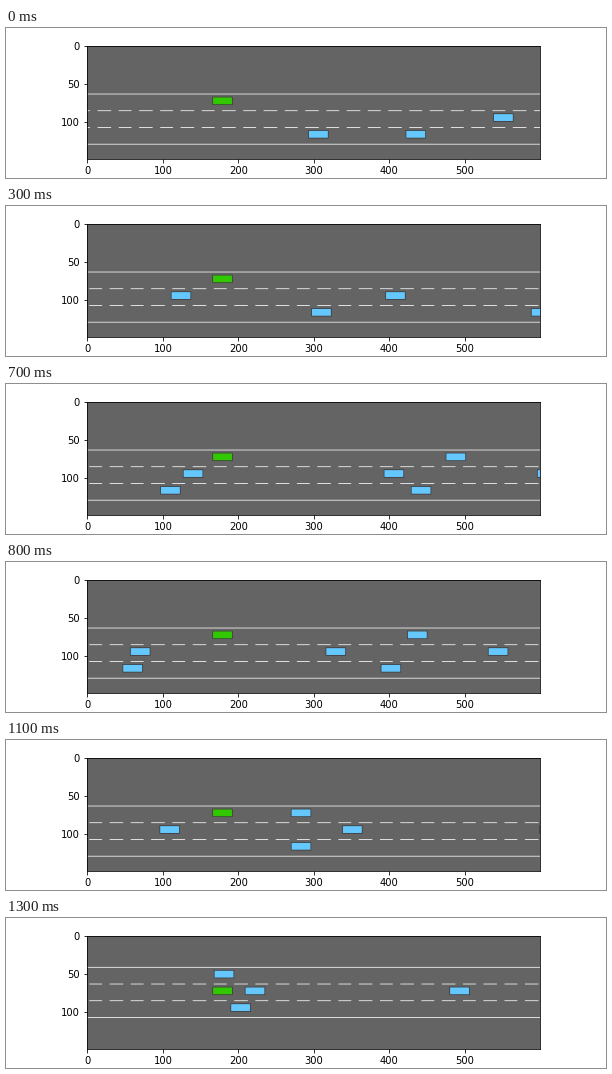
Recreate the animation shown at these times as a matplotlib script. Size 600x150 px, loop 1.4 s.

```python
import numpy as np
import matplotlib.pyplot as plt
from matplotlib.animation import FuncAnimation

DPI = 72
WIDTH, HEIGHT = 600, 150
FRAMES, INTERVAL = 14, 100

SCALE = 5.5                      # road pixels per metre
LANE = 22                        # lane height in road pixels
CAR_LENGTH, CAR_HEIGHT = 27, 11
LINE_TOP, CAR_TOP = 64, 68
EGO_X = 166
STRIPE_GAP, STRIPE_LENGTH = 27.5, 16.5
STRIPE_PHASE = 14.5

ROAD = (100, 100, 100)
WHITE = (255, 255, 255)
OUTLINE = (60, 60, 60)
GREEN = (50, 200, 0)
BLUE = (100, 200, 255)


class Car:
    """A car that the ego car passes at a given step and closing speed."""

    def __init__(self, lane, passed, speed, settle=0, weaves=False):
        self.lane, self.passed, self.speed = lane, passed, speed
        self.settle, self.weaves = settle, weaves

    def x(self, t):
        steady = EGO_X - self.speed * (t - self.passed)
        return steady - self.settle * np.exp(-0.4 * t) - ego_lead(t)

    def row(self, t):
        return max(0, self.lane - t // 2) if self.weaves else self.lane


CARS = [
    Car(2, 2.17, 66.3, weaves=True),
    Car(2, 5.66, 50.8, settle=15),
    Car(1, 6.53, 72, settle=82),
    Car(1, 9.94, 70.3, settle=-336),
    Car(0, 13.04, 51.1),
    Car(2, 13.61, 39.8),
    Car(1, 13.67, 64.4),
    Car(1, 18.28, 59.5),
]


def ego_lead(t):
    """Road pixels still to be lost while speeding up from 25 to 30 m/s."""
    return 3 * SCALE * np.exp(-1.766 * t)


def camera_shift(t):
    """Vertical camera offset as the ego car eases one lane down."""
    return int(round(LANE * (1 - np.exp(-3 * max(t - 11, 0)))))


def fill(image, x, y, w, h, color):
    image[max(y, 0):max(y + h, 0), max(x, 0):max(x + w, 0)] = color


def draw_car(image, x, y, color):
    fill(image, x, y, CAR_LENGTH, CAR_HEIGHT, OUTLINE)
    fill(image, x + 1, y + 1, CAR_LENGTH - 2, CAR_HEIGHT - 2, color)


def draw_lines(image, t, shift):
    travelled = SCALE * (30 * t - 3) + ego_lead(t)
    first = (STRIPE_PHASE - travelled) % STRIPE_GAP - STRIPE_GAP
    top, *dashed, bottom = range(LINE_TOP - shift, LINE_TOP - shift + 4 * LANE, LANE)
    for y in (top, bottom):
        fill(image, 0, y, WIDTH, 1, WHITE)
    for y in dashed:
        for x in np.arange(first, WIDTH, STRIPE_GAP):
            start, end = int(np.floor(x)), int(np.floor(x + STRIPE_LENGTH))
            fill(image, start, y, end - start + 1, 1, WHITE)


def render(t):
    image = np.full((HEIGHT, WIDTH, 3), ROAD, np.uint8)
    shift = camera_shift(t)
    draw_lines(image, t, shift)
    for car in CARS:
        y = CAR_TOP + LANE * car.row(t) - shift
        draw_car(image, int(round(car.x(t))), y, BLUE)
    draw_car(image, EGO_X, CAR_TOP, GREEN)
    return image


plt.rcParams.update({"font.family": "DejaVu Sans", "font.size": 10})
fig = plt.figure(figsize=(WIDTH / DPI, HEIGHT / DPI), dpi=DPI, facecolor="white")
ax = fig.add_axes([0.125, 0.125, 0.775, 0.755])
picture = ax.imshow(render(0))
ax.set_xticks(range(0, 600, 100))
ax.set_yticks(range(0, 150, 50))


def update(step):
    picture.set_data(render(step))
    return [picture]


anim = FuncAnimation(fig, update, frames=FRAMES, interval=INTERVAL, repeat=True)
plt.show()
```
